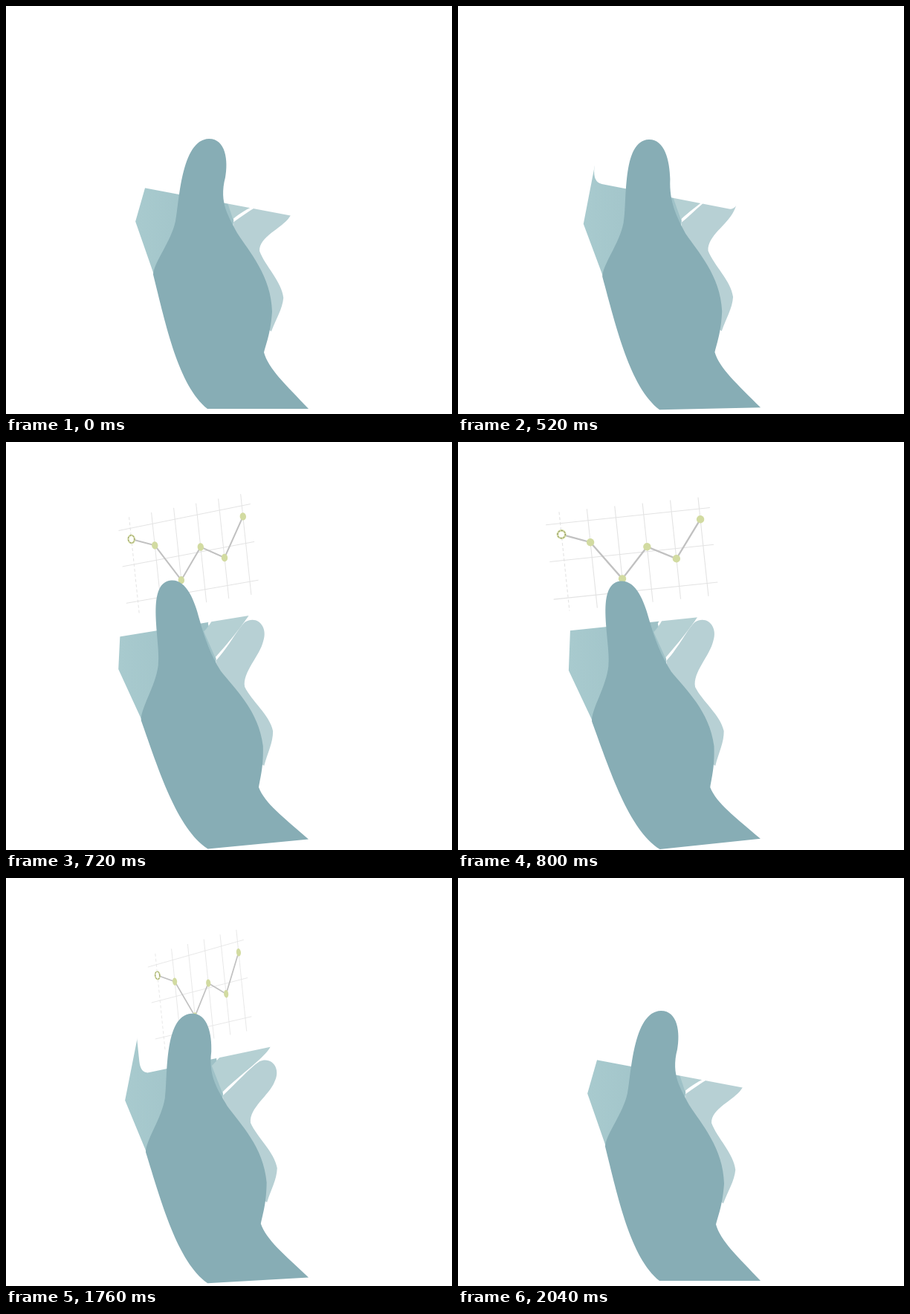
An HTML page with a canvas for the animation above (5000 ms loop, 600 by 550 pixels).

```html
<!DOCTYPE html>
<html lang="en">
<head>
<meta charset="utf-8">
<title>Hand turning a card</title>
<style>
  html, body { margin: 0; width: 100%; height: 100%; overflow: hidden; background: #fff; }
  canvas { display: block; }
</style>
</head>
<body>
<canvas id="stage" width="600" height="550"></canvas>
<script>
const ctx = document.getElementById('stage').getContext('2d');
const LOOP = 5000, STEP = 40, { PI, sin, cos, min, max } = Math;
const PIVOT = [329, 540];
const rad = deg => deg * PI / 180;
const ramp = (t, from, to) => min(1, max(0, (t - from) / (to - from)));
const ease = p => (1 - cos(PI * p)) / 2;

// Each shape has a relaxed and a stretched pose with the same commands.
const palm = {
  relaxed: 'M194 366L167 295L192 197C204 184 236 178 278 133C291 124 299 140 297 158C295 172 289 180 283 188L299 290L290 400Z',
  stretched: 'M194 366L167 295L178 199C200 184 222 155 245 100C258 88 270 100 270 115C270 140 275 170 283 188L299 290L290 400Z'
};
const fingers = [
  { color: '#9fc1c6',
    relaxed: 'M283 190C306 184 323 170 343 164C363 161 370 183 362 198C352 213 311 222 285 250L275 240Z',
    stretched: 'M283 190C288 172 292 150 304 142C323 136 334 152 331 168C326 190 305 222 285 250L275 240Z' },
  { color: '#b5d0d3',
    relaxed: 'M285 252C304 229 333 226 354 212C376 205 386 230 368 247C352 259 320 268 298 288Z',
    stretched: 'M285 252C305 235 312 200 331 189C352 179 368 204 355 222C345 240 318 268 298 288Z' },
  { color: '#b7d0d4',
    relaxed: 'M299 292C318 277 340 263 359 253C377 249 386 268 374 283C364 299 334 310 335 330C343 350 366 370 369 392C368 408 360 420 354 438L300 400Z',
    stretched: 'M299 292C318 274 330 252 341 243C358 234 372 251 364 270C358 290 333 310 335 330C343 350 366 370 369 392C368 408 360 420 354 438L300 400Z' }
];
const ARM = 'M271 543C232 512 215 430 198 362C199 345 222 318 228 290';
const HEEL = ' 300 284 311 306C327 331 357 364 358 412C356 440 351 452 347 467C353 489 376 510 407 543Z';
const thumb = {
  relaxed: ARM + 'C233 267 235 180 273 179C296 179 299 209 295 231C286 266' + HEEL,
  stretched: ARM + 'C235 262 220 178 256 178C276 178 285 207 289 234C294 262' + HEEL
};

function blend({ relaxed, stretched }, k) {
  const target = stretched.match(/\d+/g);
  let i = 0;
  return new Path2D(relaxed.replace(/\d+/g, n => +n + (target[i++] - n) * k));
}

function turned(deg, draw) {
  ctx.save();
  ctx.translate(...PIVOT);
  ctx.rotate(rad(deg));
  ctx.translate(-PIVOT[0], -PIVOT[1]);
  draw();
  ctx.restore();
}

function fill(shape, k, color) {
  ctx.fillStyle = color;
  ctx.fill(blend(shape, k));
}

const palmColor = ctx.createLinearGradient(168, 0, 300, 0);
palmColor.addColorStop(0, '#a8cace');
palmColor.addColorStop(1, '#9dc0c6');

// Maps card coordinates (origin at the middle of its lower edge) to the stage.
function cardProjection(flip, handAngle) {
  const side = -cos(PI * flip), depth = sin(PI * flip);
  const tilt = rad(10.8 - 16.8 * ease(min(1, flip / 0.75)));
  const dx = 293 - 65 * (flip - 0.65) ** 2 - PIVOT[0];
  const dy = 260 - 23 * ease(flip) - PIVOT[1];
  const a = rad(handAngle);
  const x0 = PIVOT[0] + dx * cos(a) - dy * sin(a);
  const y0 = PIVOT[1] + dx * sin(a) + dy * cos(a);
  const at = (u, v) => {
    const w = v * (1 + 0.00036 * u * depth);
    return [x0 + side * u * cos(tilt) - w * sin(tilt),
            y0 + (side * sin(tilt) - 0.079 * depth) * u + w * cos(tilt)];
  };
  return { side, tilt, at };
}

function trace(at, points) {
  ctx.beginPath();
  points.forEach(p => ctx.lineTo(...at(...p)));
}

function drawCard({ side, tilt, at }) {
  const W = 160, H = 205, R = 18, BASE = -1;
  ctx.fillStyle = ctx.strokeStyle = '#fff';
  ctx.lineWidth = 2.5;
  ctx.beginPath();
  ctx.moveTo(...at(-W, -H));
  ctx.lineTo(...at(-W, -R));
  ctx.quadraticCurveTo(...at(-W, BASE), ...at(R - W, BASE));
  ctx.lineTo(...at(W - R, BASE));
  ctx.quadraticCurveTo(...at(W, BASE), ...at(W, -R));
  ctx.lineTo(...at(W, -H));
  ctx.closePath();
  ctx.fill();
  ctx.stroke();
  if (side > 0.05) drawChart(side, tilt, at);
}

function drawChart(side, tilt, at) {
  const column = i => -101.4 + 37.6 * i;
  const thin = 0.4 + 0.6 * side;
  ctx.strokeStyle = '#e3e3e3';
  ctx.lineWidth = 1.1 * thin;
  for (const v of [-145, -95, -44]) {
    trace(at, [[-121, v], [101, v]]);
    ctx.stroke();
  }
  for (let i = 0; i < 6; i++) {
    ctx.setLineDash(i ? [] : [4, 3]);
    trace(at, [[column(i), -160.5], [column(i), -26.5]]);
    ctx.stroke();
  }
  ctx.setLineDash([]);

  const data = [-130, -115.3, -62, -101.4, -81.3, -130.7].map((v, i) => [column(i), v]);
  ctx.strokeStyle = '#c1c1c1';
  ctx.lineWidth = 2.3 * thin;
  trace(at, data);
  ctx.stroke();

  data.forEach((p, i) => {
    ctx.beginPath();
    ctx.ellipse(...at(...p), 5.2 * side, 5.2, tilt, 0, 2 * PI);
    ctx.fillStyle = i ? '#d2dba1' : '#fff';
    ctx.fill();
    if (i) return;
    ctx.strokeStyle = '#d2dba1';
    ctx.lineWidth = 2.6 * thin;
    ctx.stroke();
    ctx.strokeStyle = '#77754f';
    ctx.lineWidth = 0.9 * thin;
    ctx.setLineDash([2, 2]);
    ctx.stroke();
    ctx.setLineDash([]);
  });
}

function render(t) {
  const returning = t > 1200;
  const angle = -6 * (returning ? 1 - sin(ramp(t, 1640, 2040) * PI / 2) : ease(ramp(t, 400, 800)));
  const flip = returning ? 1 - ramp(t, 1640, 2040) : ramp(t, 403, 800);
  const reach = ramp(t, 400, 640);
  const fingerPose = reach - ramp(t, 1640, 1900);
  const thumbPose = reach - ramp(t, 1600, 1800);

  ctx.fillStyle = '#fff';
  ctx.fillRect(0, 0, 600, 550);
  turned(angle + 1.65, () => {
    fill(palm, thumbPose, palmColor);
    fingers.forEach(f => fill(f, fingerPose, f.color));
  });
  drawCard(cardProjection(flip, angle));
  turned(angle, () => fill(thumb, thumbPose, '#87adb5'));
}

function tick() {
  const t = performance.now() % LOOP;
  render(t - t % STEP);
  requestAnimationFrame(tick);
}
tick();
</script>
</body>
</html>
```
